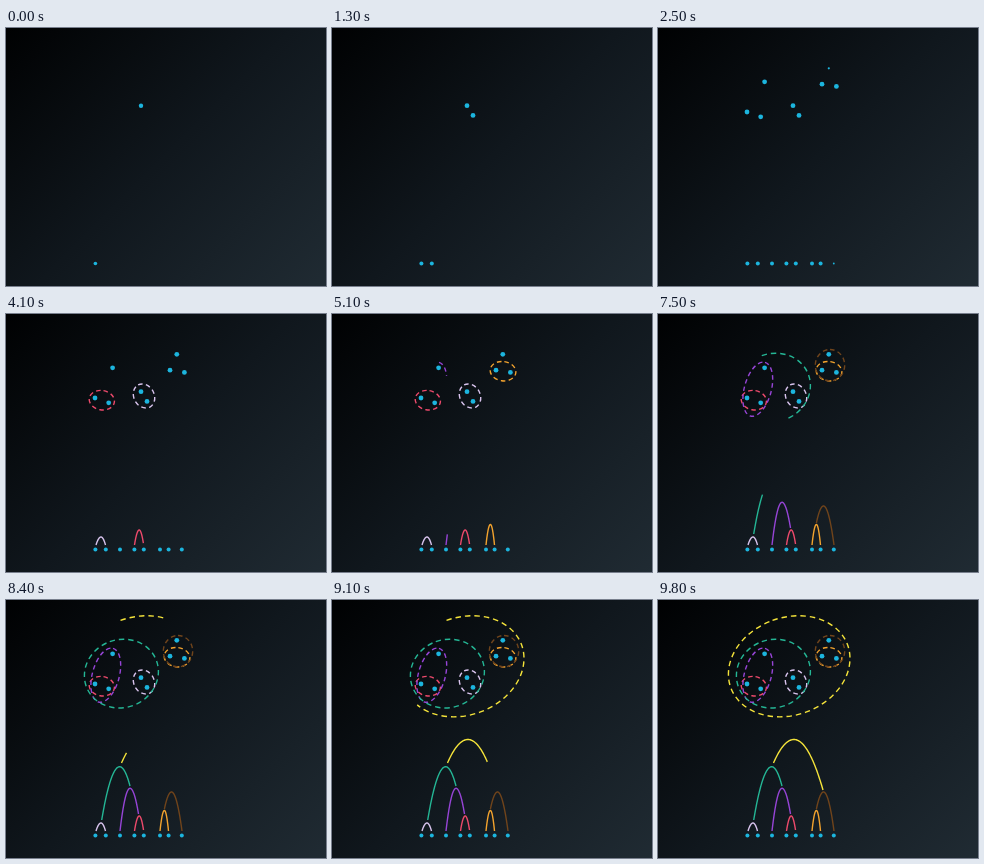
Animation, 320 px wide and 258 px high, one loop 9900 ms. Source, as an HTML page with a canvas:

```html
<!DOCTYPE html>
<html>
<head>
<meta charset="utf-8">
<style>
html, body { margin: 0; width: 100%; height: 100%; overflow: hidden; background: #000; }
canvas { display: block; width: 320px; height: 258px; }
</style>
</head>
<body>
<canvas id="stage" width="320" height="258"></canvas>
<script>
const ctx = document.getElementById('stage').getContext('2d');
const LOOP = 9900, TAU = Math.PI * 2;
const clamp = v => Math.max(0, Math.min(1, v));

// Each point: plane x, plane y, leaf x, start time
const points = [
  [135, 77.7, 89.4, -200], [141, 87.4, 99.8, 500],
  [106.6, 53.8, 114, 1300], [89, 84, 128.4, 1520],
  [102.7, 88.8, 137.8, 1740], [164, 56.2, 154, 1960],
  [178.4, 58.4, 162.6, 2180], [170.8, 40.3, 175.8, 2400]
];

// ring: cx, cy, rx, ry, tilt in degrees; arc: start, peak, end
const links = [
  { color: '#d9c4ee', at: 2750, time: 620, ring: [138, 82, 10.2, 12.5, -28], arc: [90, 231, 95, 223, 99.5, 231] },
  { color: '#ee4a6c', at: 3440, time: 680, ring: [95.8, 86.2, 12.7, 9.7, 10], arc: [128.5, 231, 133.2, 216, 137.5, 230] },
  { color: '#f3a32e', at: 4170, time: 720, ring: [171, 57.2, 12.9, 9.7, 8], arc: [154, 231, 158.4, 210.5, 162.5, 231] },
  { color: '#9644d6', at: 4960, time: 950, ring: [99.8, 75.2, 13.5, 27.8, 15], arc: [114, 231, 124, 188.3, 132.5, 214] },
  { color: '#70441b', at: 5950, time: 810, ring: [172, 51.2, 14.7, 15.7, 0], arc: [158.4, 209, 165.5, 192, 176, 231] },
  { color: '#24b695', at: 6850, time: 1300, ring: [115.4, 73.6, 37.4, 34, -20], arc: [95.7, 220, 113.7, 166.7, 124, 186] },
  { color: '#f4e33a', at: 8250, time: 1250, ring: [131.2, 66.3, 62.2, 48.8, -20], arc: [115.5, 163, 136, 139.5, 165, 190] }
];

const sky = ctx.createLinearGradient(15.5, -15.5, 304.5, 273.5);
sky.addColorStop(0, '#000102');
sky.addColorStop(0.5, '#10171d');
sky.addColorStop(1, '#202b33');

// Two half parabolas that meet at the peak
function arcPoints([x0, y0, px, py, x1, y1]) {
  const list = [];
  for (let i = -40; i <= 40; i++) {
    const u = Math.abs(i) / 40;
    const [x, y] = i < 0 ? [x0, y0] : [x1, y1];
    list.push([px + (x - px) * u, py + (y - py) * u * u]);
  }
  return list;
}

for (const link of links) {
  link.path = arcPoints(link.arc);
  link.length = link.path.reduce((sum, p, i, all) =>
    i ? sum + Math.hypot(p[0] - all[i - 1][0], p[1] - all[i - 1][1]) : 0, 0);
  const [, , a, b] = link.ring;
  const around = Math.PI * (3 * (a + b) - Math.sqrt((3 * a + b) * (a + 3 * b)));
  const step = around / Math.round(around / (a > 30 ? 9.4 : 8));
  link.dash = [step * 0.58, step * 0.42];
}

function drawLink({ color, at, time, ring, path, length, dash }, t) {
  const p = clamp((t - at) / time);
  if (!p) return;
  const [cx, cy, a, b, tilt] = ring;
  ctx.strokeStyle = color;
  ctx.setLineDash(dash);
  ctx.beginPath();
  ctx.ellipse(cx, cy, a, b, tilt * Math.PI / 180, -TAU / 4, -TAU / 4 + TAU * p);
  ctx.stroke();
  ctx.setLineDash([length * p, length + 9]);
  ctx.beginPath();
  path.forEach(([x, y]) => ctx.lineTo(x, y));
  ctx.stroke();
}

function dot(x, y, r) {
  ctx.beginPath();
  ctx.arc(x, y, r, 0, TAU);
  ctx.fill();
}

function draw(now) {
  const t = now % LOOP;
  ctx.fillStyle = sky;
  ctx.fillRect(0, 0, 320, 258);
  ctx.lineWidth = 1.4;
  links.forEach(link => drawLink(link, t));
  ctx.fillStyle = '#1cb5de';
  for (const [x, y, leaf, at] of points) {
    const s = clamp((t - at) / 220);
    dot(x, y, 2.4 * s);
    dot(leaf, 235.5, 2 * s);
  }
}

const start = performance.now();
function tick() {
  draw(performance.now() - start);
  requestAnimationFrame(tick);
}
tick();
</script>
</body>
</html>
```
